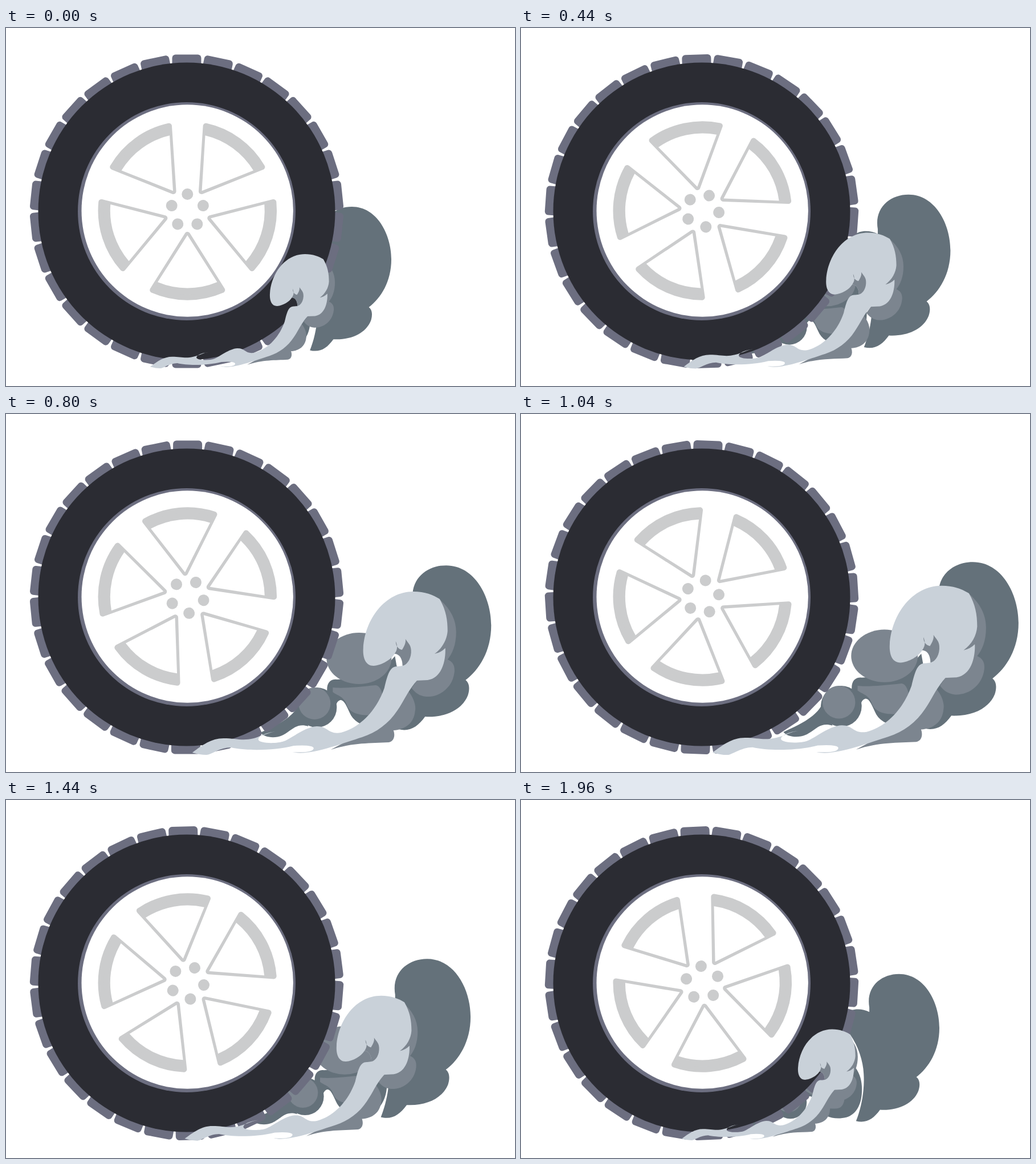
Animation of 893x627 px, one loop 2 s. Source, as an HTML page:

```html
<!DOCTYPE html>
<html lang="en">
<head>
<meta charset="utf-8">
<title>Spinning wheel</title>
<style>
html, body { margin: 0; width: 100%; height: 100%; overflow: hidden; background: #fff; }
svg { display: block; width: 100vw; height: 100vh; }
.dark { fill: #64717a; }
.mid { fill: #7c858f; }
.light { fill: #c9d1d9; }
.tread { fill: #6c6e80; }
.spoke { fill: #cbcccd; stroke: #cbcccd; stroke-width: 10; stroke-linejoin: round; }
</style>
</head>
<body>
<svg viewBox="0 0 893 627">
  <g id="back" class="dark">
    <path d="M712 330 C705 290 735 265 770 265 C820 265 849 320 849 370 C849 415 828 448 804 466
      C812 472 811 484 808 493 C798 518 768 532 733 530 C720 548 706 557 686 552
      C697 525 703 490 701 460 C700 435 690 405 675 384 C664 370 658 352 666 342 C678 331 698 332 712 339Z"/>
  </g>
  <g id="middle">
    <path class="dark" d="M563 485 C562 470 570 464 580 465 L650 460 L682 424 L685 441 C695 455 699 472 698 492
      C697 520 685 540 665 546 C640 552 615 545 605 528 C597 512 594 502 587 501 C580 502 578 510 576 522
      L566 493Z"/>
    <circle class="dark" cx="545" cy="514" r="35"/>
    <path class="dark" d="M515 500 C512 528 475 545 446 558 C452 566 470 569 484 563 C500 556 508 540 530 547Z"/>
    <circle class="mid" cx="541" cy="507" r="28"/>
    <ellipse class="mid" cx="619" cy="428" rx="57" ry="45"/>
    <path class="mid" d="M573 479 C590 481 620 478 648 475 C664 476 668 526 645 527 C622 529 602 525 597 508 C592 494 580 493 573 487Z"/>
  </g>
  <g id="shade" class="mid">
    <path d="M758 322 C780 340 790 360 790 382 C790 405 783 420 775 430 C785 434 788 442 787 452
      C784 480 760 496 738 495 C725 494 718 488 712 480 L740 440 L745 350Z"/>
    <path d="M704 483 C715 495 720 510 718 520 C716 542 700 553 680 554 C683 562 682 573 672 575
      C640 577 610 575 570 588 L640 550Z"/>
  </g>
  <g id="tread" class="tread"></g>
  <circle cx="317" cy="321" r="260.5" fill="#2b2c33"/>
  <circle class="tread" cx="317" cy="321" r="191"/>
  <circle cx="318.2" cy="320" r="185.7" fill="#fff"/>
  <g id="rim"></g>
  <g id="front">
    <path class="light" d="M627 410 C630 360 665 311 715 311 C735 311 750 317 761 324 C772 343 775 360 775 380
      C774 395 766 410 752 420 Q763 418 771 410 C772 430 766 462 740 466 L718 467 L690 470 L696 441
      C696 428 690 420 682 420 C676 430 660 440 645 441 C630 441 626 425 627 410Z"/>
    <path class="light" d="M696 441 L722 466 C705 485 700 500 687 519 C672 542 650 558 625 566
      C590 577 530 600 503 592 Q540 594 540 585 Q538 579 505 581 C470 590 420 590 395 584
      C375 584 360 597 352 597 Q340 597 327 593 C345 580 360 568 382 568 S415 573 435 568 S460 557 477 556
      C460 557 443 563 443 570 S475 578 488 573 S525 548 545 547 S565 562 588 558
      C625 548 652 515 664 480 C670 455 674 441 688 442Z"/>
    <path class="mid" d="M684 398 C684 408 690 412 695 413 C700 405 702 400 701 394 C706 402 712 405 711 418
      C710 432 702 440 696 441 C696 428 690 420 682 420 C688 412 687 405 684 398Z"/>
  </g>
</svg>
<script>
const LOOP = 2000, STEP = 40, PEAK = 1020, LAST = LOOP - STEP;
const el = id => document.getElementById(id);
const move = (id, value) => el(id).setAttribute('transform', value);
const repeat = (n, draw) => Array.from({ length: n }, (_, i) => draw(i * 360 / n)).join('');

el('tread').innerHTML = repeat(30, a =>
  `<rect x="-25.5" y="-274.5" width="51" height="30" rx="6" transform="rotate(${a})"/>`);
el('rim').innerHTML = repeat(5, a => `<g transform="rotate(${a})">
  <path class="spoke" d="M0 42 L61 139 A152 152 0 0 1 -61 139Z"/>
  <path fill="#fff" d="M0 43 L52.2 125 A135.5 135.5 0 0 1 -52.2 125Z"/>
  <circle cy="-29" r="10" fill="#cbcccd"/></g>`);

// Each puff swells from its start to its top, then sinks to its end; x and y anchor the scaling.
const puffs = {
  back: { x: 849, y: 652, left: { start: 676, top: 873, end: 734 }, size: { start: .876, top: 1.015, end: .897 } },
  middle: { x: 587, y: 600, left: { start: 445, top: 605, end: 507 }, size: { start: .8, top: 1.025, end: .82 } },
  shade: { x: 327, y: 594, left: { start: 253, top: 336, end: 276 }, size: { start: .7, top: 1.037, end: .68 } },
  front: { x: 327, y: 594, left: { start: 253, top: 336, end: 282 }, size: { start: .7, top: 1.037, end: .68 } }
};

function frame(now) {
  const t = Math.floor(now % LOOP / STEP) * STEP;
  const rising = t < PEAK;
  const part = rising ? t / PEAK : (LAST - t) / (LAST - PEAK);
  const swell = (1 - Math.cos(Math.PI * part)) / 2;
  const mix = ({ start, top, end }) => {
    const low = rising ? start : end;
    return low + (top - low) * swell;
  };
  for (const [id, { x, y, left, size }] of Object.entries(puffs))
    move(id, `translate(${mix(left)} ${y}) scale(${mix(size)}) translate(${-x} ${-y})`);

  // The tread turns at half the speed of the rim and lags a little mid-loop.
  const turn = t * .218;
  move('tread', `translate(317 321) rotate(${turn / 2 - 3 * Math.sin(Math.PI * t / LOOP)})`);
  move('rim', `translate(318.3 320) rotate(${turn})`);
  requestAnimationFrame(frame);
}
frame(0);
</script>
</body>
</html>
```
